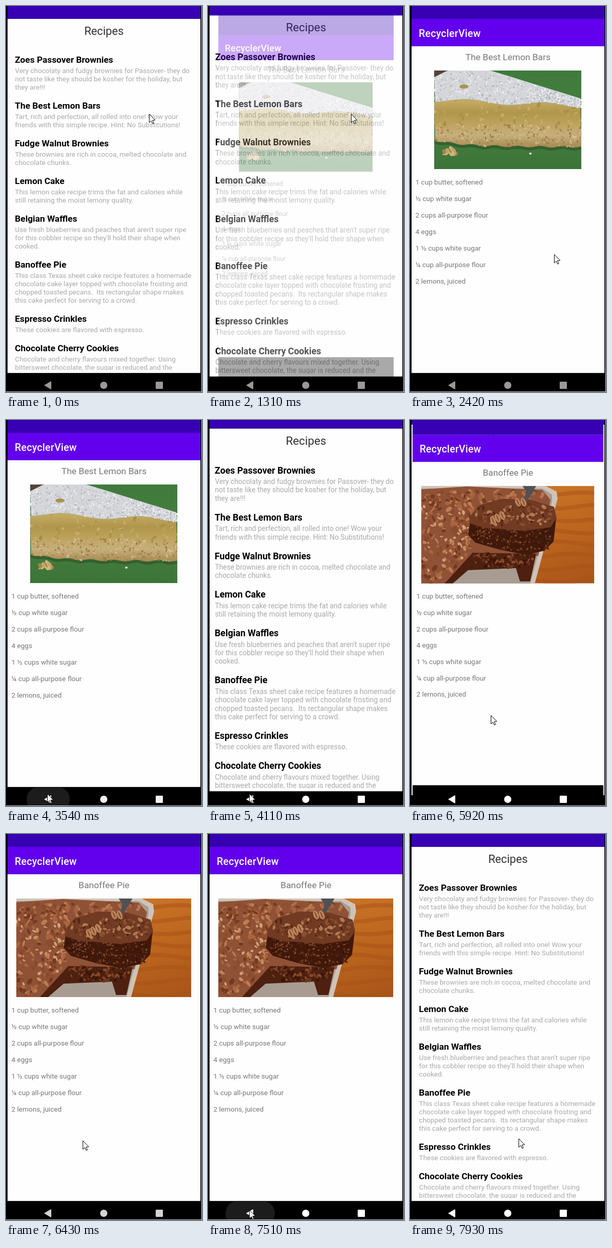
An HTML page with a canvas for the animation above (8 s loop, 381 px wide and 748 px high).

```html
<!DOCTYPE html>
<html lang="en">
<head>
<meta charset="utf-8">
<title>Recipe list</title>
<style>
html, body { margin: 0; width: 100%; height: 100%; overflow: hidden; background: #000; }
canvas { display: block; width: 381px; height: 748px; }
</style>
</head>
<body>
<canvas id="stage"></canvas>
<script>
const W = 381, H = 748, LOOP = 8000, STEP = 135;
const LEFT = 3, RIGHT = 378, MID_X = 190.5, MID_Y = 374;
const STATUS = 25, NAV = 711.4;
const PAPER = '#fefefe', GREY = '#777';

const recipes = [
  ['Zoes Passover Brownies', 'Very chocolaty and fudgy brownies for Passover- they do',
    'not taste like they should be kosher for the holiday, but', 'they are!!!'],
  ['The Best Lemon Bars', 'Tart, rich and perfection, all rolled into one! Wow your',
    'friends with this simple recipe. Hint: No Substitutions!'],
  ['Fudge Walnut Brownies', 'These brownies are rich in cocoa, melted chocolate and', 'chocolate chunks.'],
  ['Lemon Cake', 'This lemon cake recipe trims the fat and calories while',
    'still retaining the moist lemony quality.'],
  ['Belgian Waffles', "Use fresh blueberries and peaches that aren't super ripe",
    "for this cobbler recipe so they'll hold their shape when", 'cooked.'],
  ['Banoffee Pie', 'This class Texas sheet cake recipe features a homemade',
    'chocolate cake layer topped with chocolate frosting and',
    'chopped toasted pecans.\u00a0 Its rectangular shape makes', 'this cake perfect for serving to a crowd.'],
  ['Espresso Crinkles', 'These cookies are flavored with espresso.'],
  ['Chocolate Cherry Cookies', 'Chocolate and cherry flavours mixed together. Using',
    'bittersweet chocolate, the sugar is reduced and the']
];
const ingredients = ['1 cup butter, softened', '½ cup white sugar', '2 cups all-purpose flour',
  '4 eggs', '1 ½ cups white sugar', '¼ cup all-purpose flour', '2 lemons, juiced'];

// Each visit opens a dish, presses the back button and returns to the list.
// A lag is how far the motion has already run when it is first seen.
const visits = [
  { open: 1310, openLag: 38, press: 3540, pressLag: 150, back: 4110, backLag: 85,
    dish: { name: 'The Best Lemon Bars', x: 47, w: 286, photo: lemonPhoto } },
  { open: 5770, openLag: 11, press: 7090, pressLag: 38, back: 7630, backLag: 140,
    dish: { name: 'Banoffee Pie', x: 20, w: 340, photo: cakePhoto } }
];

// Pointer moves: one key point every second step.
const moves = [
  { at: 0, path: [[278, 209]] },
  { at: 2420, path: [[280, 481], [313, 699], [112, 738], [80, 724]] },
  { at: 4530, path: [[98, 668], [154, 574], [157, 572]] },
  { at: 6310, path: [[149, 594], [110, 682], [80, 728]] },
  { at: 7660, path: [[80, 728], [211, 590]] }
];

const clamp = v => Math.min(1, Math.max(0, v));
const easeOut = u => 1 - (1 - clamp(u)) ** 3;
const lerp = (a, b, u) => a + (b - a) * u;
const stepped = (t, start) => Math.floor((t - start) / STEP) * STEP;
const grey = v => `rgb(${v},${v},${v})`;

const canvas = document.getElementById('stage');
const layer = document.createElement('canvas');
const dpr = window.devicePixelRatio || 1;
for (const c of [canvas, layer]) { c.width = W * dpr; c.height = H * dpr; }
const main = canvas.getContext('2d');
const side = layer.getContext('2d');

function rect(g, color, x, y, w, h) {
  g.fillStyle = color;
  g.fillRect(x, y, w, h);
}

function poly(g, color, ...p) {
  g.fillStyle = color;
  g.beginPath();
  for (let i = 0; i < p.length; i += 2) g.lineTo(p[i], p[i + 1]);
  g.closePath();
  g.fill();
}

function blob(g, color, x, y, rx, ry, turn = 0) {
  g.fillStyle = color;
  g.beginPath();
  g.ellipse(x, y, rx, ry, turn, 0, 7);
  g.fill();
}

// Fill between two height functions.
function band(g, color, x0, x1, top, bottom) {
  const p = [];
  for (let x = x0; x <= x1; x += 4) p.push(x, top(x));
  for (let x = x1; x >= x0; x -= 4) p.push(x, bottom(x));
  poly(g, color, ...p);
}

function specks(g, rnd, n, x0, x1, top, bottom, colors, size) {
  for (let i = 0; i < n; i++) {
    const x = lerp(x0, x1, rnd()), y = lerp(top(x), bottom(x), rnd());
    const color = colors[Math.floor(rnd() * colors.length)];
    blob(g, color, x, y, size * (.5 + rnd()), size * (.3 + rnd() * .6), rnd() * 3);
  }
}

function gradient(g, x0, y0, x1, y1, ...colors) {
  const fill = g.createLinearGradient(x0, y0, x1, y1);
  colors.forEach((c, i) => fill.addColorStop(i / (colors.length - 1), c));
  return fill;
}

function text(g, str, x, y, size, color, weight = 400, align = 'left') {
  g.font = `${weight} ${size}px Roboto, sans-serif`;
  g.fillStyle = color;
  g.textAlign = align;
  g.fillText(str, x, y);
}

function random(seed) {
  return () => (seed = (seed * 16807) % 2147483647) / 2147483647;
}

function lemonPhoto(g) {
  const rnd = random(41);
  const top = x => Math.max(125, 126 + (x - 160) * .31, 138 - (x - 47) * .5);
  const sugar = x => 182 + (x - 47) * .04 + 4 * Math.sin(x / 24);
  const custard = x => 231 + 4 * Math.sin(x / 38);
  const crust = x => 273 - 13 * Math.exp((47 - x) / 60) + 1.5 * Math.sin(x / 7);
  rect(g, gradient(g, 0, 125, 0, 316, '#3f7a3c', '#47803f', '#3c7438'), 47, 125, 286, 191);
  poly(g, '#54443a', 47, 125, 112, 125, 47, 150);
  band(g, '#35602f', 47, 333, crust, x => crust(x) + 6);
  band(g, gradient(g, 0, 185, 0, 272, '#c2aa62', '#b0954b', '#bea25d', '#c6af7c', '#a98c55'),
    47, 333, sugar, crust);
  specks(g, rnd, 60, 47, 333, sugar, custard, ['#b99f55', '#a98e44', '#c4ad69'], 4);
  specks(g, rnd, 320, 47, 333, custard, crust, ['#d2bd8c', '#b39663', '#9c7d49', '#c7ae78'], 2.2);
  band(g, '#d4d6da', 47, 333, top, sugar);
  specks(g, rnd, 700, 47, 333, x => top(x) + 2, sugar, ['#f3f4f6', '#bfc2c8', '#e6e8eb', '#a9acb3'], 1.6);
  blob(g, '#a99254', 105, 156, 9, 4);
  specks(g, rnd, 24, 66, 90, () => 277, () => 287, ['#c0a468', '#a5834b', '#d1b77f'], 4);
  blob(g, '#e3e6df', 234, 286, 2.5, 2);
}

function cakePhoto(g) {
  const rnd = random(97);
  const rim = y => 288 - Math.max(0, y - 150) * .27;
  const cut = x => Math.min(316, 372 - x);
  rect(g, gradient(g, 280, 125, 350, 316, '#c97427', '#bb641d', '#a9541a'), 20, 125, 340, 191);
  for (let y = 138; y < 316; y += 24) {
    const dip = x => y + 4 * Math.sin(x / 30 + y);
    band(g, y % 48 ? '#a8521880' : '#cf823a80', 240, 360, dip, x => dip(x) + 8);
  }
  poly(g, '#cfc3b7', 20, 125, 264, 125, 286, 136, rim(150), 150, rim(316), 316, 20, 316);
  poly(g, '#a89c92', 20, 130, 258, 130, 277, 142, 277, 156, rim(316) - 9, 316, 20, 316);
  poly(g, '#8f5236', 20, 132, 110, 126, 258, 133, 274, 152, 250, 262, 120, 258, 68, 316, 20, 316);
  specks(g, rnd, 190, 20, 122, () => 134, cut, ['#a8653f', '#74391f', '#bd7c54', '#8a4a2c'], 5);
  specks(g, rnd, 45, 20, 122, () => 150, cut, ['#d3a27a', '#c58c60'], 3.5);
  specks(g, rnd, 40, 112, 262, () => 134, () => 160, ['#a5623f', '#74391f', '#b8774f'], 5);
  poly(g, '#4d200f', 121, 256, 246, 258, 234, 312, 214, 312, 206, 286, 112, 290, 82, 316, 66, 316);
  specks(g, rnd, 70, 122, 240, () => 258, () => 284, ['#6d351c', '#3a160a', '#8a4a2c'], 3.5);
  poly(g, '#41190b', 116, 196, 285, 190, 280, 234, 262, 252, 226, 260, 174, 250, 126, 236, 112, 220);
  const crumbLow = x => 230 + 22 * clamp((x - 118) / 70);
  specks(g, rnd, 260, 120, 274, () => 204, crumbLow, ['#703a1f', '#351307', '#5c2a14', '#86502f'], 2);
  poly(g, '#713a22', 134, 163, 178, 150, 235, 152, 281, 166, 286, 188, 274, 206, 222, 213,
    142, 207, 114, 198, 118, 182);
  specks(g, rnd, 90, 128, 276, () => 162, () => 202, ['#8a4f32', '#52240f', '#b07a55', '#65301a'], 4);
  poly(g, '#505156', 219, 125, 246, 125, 238, 138, 229, 154, 222, 152, 226, 136);
  for (let i = 0; i < 5; i++) {
    const x = i < 3 ? 161 + i * 9 : 177 + i * 11, y = i < 3 ? 193 - i * 5 : 157;
    blob(g, '#bd875c', x, y, 5, 9, -.4);
    blob(g, '#7a4224', x, y, 1, 7, -.4);
  }
}

function clipTo(g, x, y, w, h) {
  g.beginPath();
  g.rect(x, y, w, h);
  g.clip();
}

// Draw one app window scaled around the middle of the screen.
function appWindow(g, scale, content) {
  g.save();
  clipTo(g, LEFT, 0, RIGHT - LEFT, H);
  g.translate(MID_X, MID_Y);
  g.scale(scale, scale);
  g.translate(-MID_X, -MID_Y);
  rect(g, PAPER, LEFT, STATUS, RIGHT - LEFT, NAV - STATUS);
  rect(g, '#3700b3', LEFT, -60, RIGHT - LEFT, 60 + STATUS);
  rect(g, '#000', LEFT, NAV, RIGHT - LEFT, 100);
  content(g);
  g.restore();
}

function listPage(g) {
  text(g, 'Recipes', MID_X, 55.5, 21.8, '#333', 400, 'center');
  clipTo(g, LEFT, 60, RIGHT - LEFT, 646);
  let y = 110;
  for (const [title, ...lines] of recipes) {
    text(g, title, 17.3, y, 17.3, '#000', 700);
    lines.forEach((line, i) => text(g, line, 17.6, y + 20 + i * 16, 13.5, '#a9a9a9'));
    y += 41 + lines.length * 16;
  }
}

function detailPage(g, dish) {
  rect(g, '#6200ee', LEFT, STATUS, RIGHT - LEFT, 53);
  g.letterSpacing = '0.24px';
  text(g, 'RecyclerView', 16.9, 59.5, 19.6, '#fff', 500);
  g.letterSpacing = '0px';
  text(g, dish.name, MID_X, 104.7, 17.4, GREY, 400, 'center');
  ingredients.forEach((item, i) => text(g, item, 10.6, 346 + i * 32, 13.55, GREY));
  clipTo(g, dish.x, 125, dish.w, 191);
  dish.photo(g);
}

function screen(t) {
  const visit = visits.findLast(v => t >= v.open);
  if (!visit) return appWindow(main, 1, listPage);
  if (t >= visit.back) {
    const u = (stepped(t, visit.back) + visit.backLag) / 400;
    return appWindow(main, 1 + .05 * (1 - easeOut(u)), listPage);
  }
  const age = stepped(t, visit.open) + visit.openLag;
  const grow = easeOut(age / 250);
  if (grow < 1) appWindow(main, 1 + .05 * grow, listPage);
  side.setTransform(dpr, 0, 0, dpr, 0, 0);
  side.clearRect(0, 0, W, H);
  appWindow(side, lerp(.85, 1, grow), g => detailPage(g, visit.dish));
  main.globalAlpha = clamp(age / 115);
  main.drawImage(layer, 0, 0, W, H);
  main.globalAlpha = 1;
}

// The back button ripples when pressed; the icons light up and later dim.
function navIcons(g, t) {
  const visit = visits.findLast(v => t >= v.press);
  let light = 0;
  if (visit) {
    const age = stepped(t, visit.press);
    const grow = easeOut((age + visit.pressLag) / 300);
    light = grow * (1 - clamp((age - 2560) / 650));
    if (t < visit.back) {
      const half = 48 * grow, r = Math.min(half, 24);
      g.fillStyle = grey(28);
      g.beginPath();
      g.roundRect(82 - half, 735 - r, half * 2, r * 2, r);
      g.fill();
    }
  }
  const color = grey(lerp(153, 255, light));
  poly(g, color, 74, 735, 87, 727.3, 88, 728, 88, 742, 87, 742.7);
  blob(g, color, 190, 735, 7, 7);
  g.beginPath();
  g.roundRect(291, 728, 14, 14, 1.2);
  g.fill();
}

function pointer(g, t) {
  const { at, path } = moves.findLast(m => t >= m.at);
  const s = Math.min(path.length - 1, stepped(t, at) / STEP / 2);
  const a = path[Math.floor(s)], b = path[Math.ceil(s)];
  g.save();
  g.translate(Math.round(lerp(a[0], b[0], s % 1)) + .5, Math.round(lerp(a[1], b[1], s % 1)) + .5);
  poly(g, '#fff', 0, 0, 0, 16.5, 3.8, 13, 6.4, 18.6, 8.8, 17.6, 6.3, 12, 11.3, 11.6);
  g.strokeStyle = '#000';
  g.lineWidth = 1;
  g.stroke();
  g.restore();
}

function draw(t) {
  main.setTransform(dpr, 0, 0, dpr, 0, 0);
  rect(main, '#000', 0, 0, W, H);
  screen(t);
  navIcons(main, t);
  rect(main, '#ddd', 380, 0, 1, H);
  rect(main, '#ccc', 0, 747, W, 1);
  pointer(main, t);
}

const start = performance.now();
function tick() {
  draw((performance.now() - start) % LOOP);
  requestAnimationFrame(tick);
}
tick();
</script>
</body>
</html>
```
